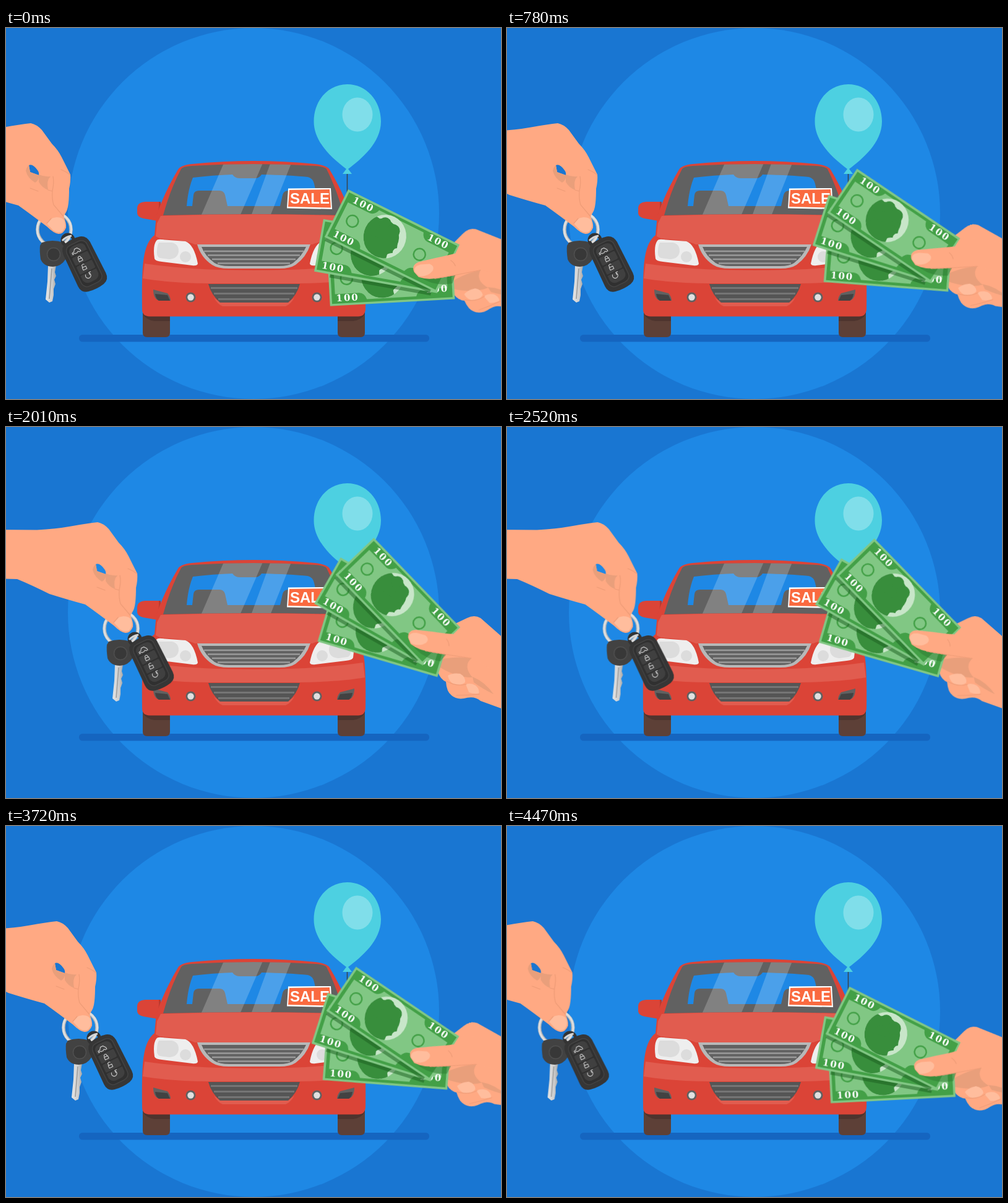
An HTML page that plays this animation: 800 px wide and 600 px high, repeating every 4500 ms.

```html
<!DOCTYPE html>
<html lang="en">
<head>
<meta charset="utf-8">
<title>Car sale</title>
<style>
  html, body { margin: 0; width: 100%; height: 100%; overflow: hidden; background: #1976d2; }
  svg { display: block; width: 100vw; height: 100vh; }
  .sale { font: bold 24px "Liberation Sans", Arial, sans-serif; fill: #fff; text-anchor: middle; }
  .value { font: bold 15px "DejaVu Serif", serif; letter-spacing: 2px; fill: #fff; text-anchor: middle; }
  .skin { fill: #ffa983; }
  .shade { fill: #e99f7b; }
  .nail { fill: #ffbd9d; }
  .crease { fill: none; stroke: #ee9c77; stroke-width: 1.2; stroke-linecap: round; }
  .red { fill: #db4437; }
  .light { fill: #e15c4f; }
  .icon { fill: none; stroke: #c8c8c8; stroke-width: 1.3; }
  .drop { stroke: #1b5e20; stroke-width: 7; opacity: .5; }
  #money { transform-origin: 810px 340px; }
</style>
</head>
<body>
<svg viewBox="0 0 800 600">
  <defs>
    <linearGradient id="steel" x2="1">
      <stop offset="0" stop-color="#e6e6e6"/>
      <stop offset=".6" stop-color="#cfcfcf"/>
      <stop offset="1" stop-color="#a8a8a8"/>
    </linearGradient>
    <clipPath id="oval"><ellipse cx="87" cy="42" rx="34.500" ry="35.500"/></clipPath>
    <clipPath id="glass"><path d="M283 228Q285 224 300 223Q400 217 500 223Q515 224 518 228Q535 262 546 303Q400 299 254 303Q265 262 283 228Z"/></clipPath>

    <g id="bill">
      <rect width="202" height="86" fill="#81c784"/>
      <rect x="3.500" y="3.500" width="195" height="79" fill="#43a047"/>
      <path fill="#81c784" d="M60 8H140Q143 18 152 19H191V67H152Q143 68 140 78H60Q57 68 48 67H9V19H48Q57 18 60 8Z"/>
      <ellipse cx="87" cy="42" rx="34.500" ry="35.500" fill="#c8e6c9"/>
      <g fill="#388e3c" clip-path="url(#oval)">
        <ellipse cx="81" cy="46" rx="30" ry="30"/>
        <circle cx="62" cy="30" r="11"/>
        <circle cx="78" cy="23" r="10"/>
        <circle cx="95" cy="28" r="11"/>
        <path d="M66 50L110 42 113 50 108 54 110 60 103 65 106 82H60Z"/>
      </g>
      <g fill="none" stroke="#43a047" stroke-width="2.500">
        <circle cx="29" cy="43" r="9.500"/>
        <circle cx="150" cy="43" r="9.500"/>
      </g>
      <g class="value">
        <text x="33" y="16">100</text><text x="168" y="16">100</text><text x="29" y="79">100</text>
      </g>
    </g>

    <g id="side">
      <path fill="#5d4037" d="M221 450H265V493Q265 500 258 500H228Q221 500 221 493Z"/>
      <path fill="#4e342e" d="M221 450H265V474H240Q226 472 221 462Z"/>
      <path class="red" d="M249 281H225Q212 282 212 292V300Q213 306 222 308L245 312 250 303Z"/>
      <path fill="#b93a30" d="M247 281H250L250 303 245 312 243 306Q248 295 247 281Z"/>
    </g>
    <g id="lamps">
      <path fill="#eee" d="M240 373Q237 352 243 344Q245 341 252 342L290 345Q304 350 310 381Q309 385 301 384L252 378Q241 377 240 373Z"/>
      <path fill="#dcdcdc" d="M247 347H268Q279 349 279 361 278 373 264 374L249 372Q243 370 244 361 244 352 247 347Z"/>
      <circle cx="290" cy="370" r="9" fill="#dcdcdc"/>
      <path fill="#616161" d="M238 423L261 429Q266 435 266 441H247Q238 438 238 423Z"/>
      <path fill="#424242" d="M241 430L261 432 265 441H247Q242 438 241 430Z"/>
      <circle cx="298.500" cy="435.500" r="8" fill="#616161"/>
      <circle cx="298.500" cy="435.500" r="5.200" fill="#e0e0e0"/>
    </g>
  </defs>

  <rect width="800" height="600" fill="#1976d2"/>
  <circle cx="400" cy="300" r="300" fill="#1e88e5"/>
  <rect x="118" y="496" width="566" height="11.500" rx="5.500" fill="#1565c0"/>

  <g id="balloon">
    <path d="M551.500 234V300" stroke="#37474f" stroke-width="1.600"/>
    <path fill="#4dd0e1" d="M551.500 91C582 91 606 117 606 151C606 186 574 212 553 228L559 236H544L550 228C529 212 497.500 186 497.500 151C497.500 117 521 91 551.500 91Z"/>
    <ellipse cx="568" cy="140" rx="24.500" ry="27.500" fill="#80deea"/>
  </g>

  <g id="car">
    <use href="#side"/>
    <use href="#side" transform="matrix(-1 0 0 1 801 0)"/>
    <path class="red" d="M278 229Q282 222 300 220Q400 210 500 220Q519 222 523 229Q544 264 558 303L561 335Q574 345 578 370Q582 390 581 455Q580 466.500 569 466.500H232Q220 466 220 455Q219 390 223 370Q227 345 240 335L243 303Q257 264 278 229Z"/>
    <path class="light" d="M250 304Q400 299 551 304L557 316 559 337Q554 340 547 341Q511 343 495 350H305Q290 343 254 341Q247 340 242 337L244 316Z"/>
    <path class="light" d="M224 381Q300 392 400 392T577 381L580 405Q541 412 474 413H326Q260 412 221 405Z"/>
    <path class="light" d="M336 436L346 444H456L466 436Q460 447 452 450H350Q342 447 336 436Z"/>
    <g clip-path="url(#glass)">
      <rect x="250" y="210" width="300" height="100" fill="#616161"/>
      <path fill="#1e88e5" d="M302 242Q335 238 366 237Q370 243 378 243H404Q410 242 413 237Q460 238 488 241Q496 243 498 252L506 288H292Q294 262 302 242Z"/>
      <path fill="#616161" d="M301 288L303 270Q304 263 312 263H345Q352 263 354 270L358 288ZM443 288L447 270Q449 263 456 263H489Q496 263 497 270L500 288Z"/>
      <path fill="#fff" opacity=".2" d="M354 214H417L378 304H315ZM429 214H463L427 304H396Z"/>
    </g>
    <path fill="#fff" d="M456 259.500L525 259 527 293 454 291.500Z"/>
    <path fill="#fa6a3f" d="M458 262L523 261 525 290.500 456 289Z"/>
    <text class="sale" x="491" y="284">SALE</text>
    <path fill="#b8b8b8" d="M309 350H492Q485 371 468 383Q459 389 442 389H360Q342 389 333 383Q315 371 309 350Z"/>
    <path fill="#616161" d="M316 354H485Q478 369 464 380Q457 385 441 385H361Q345 385 337 380Q322 369 316 354Z"/>
    <path stroke="#9a9a9a" stroke-width="2.600" d="M320 361H481M326 367.500H475M333 374H468M342 380.500H459"/>
    <path fill="#555" d="M327 414H475Q470 432 456 444H346Q332 432 327 414Z"/>
    <path stroke="#757575" stroke-width="3" d="M331 420.500H471M336 429.500H466M343 438.500H458"/>
    <use href="#lamps"/>
    <use href="#lamps" transform="matrix(-1 0 0 1 801 0)"/>
  </g>

  <g id="money">
    <g transform="rotate(-19.650 810 340)">
      <path class="skin" d="M698 396Q702 408 711 412Q712 428 720 434Q728 441 740 439Q757 434 767 443L800 455 900 492V425L800 338 767 309Q757 303 745 309L722 320 680 360Z"/>
      <path class="shade" d="M700 376Q730 370 752 374Q738 387 754 405Q730 406 700 388ZM754 404Q774 412 788 432Q771 424 756 413Z"/>
      <path class="nail" d="M714 402Q722 397 734 399Q743 404 742 413Q735 419 724 416 716 412 714 402ZM743 416Q751 413 759 418 766 424 764 431 755 432 748 429Z"/>
      <path class="crease" d="M712 411Q727 420 744 416M728 434Q747 434 765 432"/>
    </g>
    <g transform="translate(519 364) rotate(-3.200)">
      <use href="#bill"/>
      <text class="value" x="174" y="73">100</text>
    </g>
    <g transform="translate(513 309) rotate(10)">
      <path class="drop" d="M26 88H192"/>
      <use href="#bill"/>
    </g>
    <g transform="translate(553 261) rotate(26.400)">
      <path class="drop" d="M3 88H192"/>
      <use href="#bill"/>
    </g>
    <g transform="rotate(-19.650 810 340)">
      <path fill="#2e7d32" opacity=".5" d="M656 352Q680 362 712 367L702 379Q672 374 656 352Z"/>
      <path class="skin" d="M650 341Q649 329 662 328L690 331Q710 334 723 335L736 322 800 345V400L752 374Q735 370 712 368Q692 366 678 362Q664 359 654 351Z"/>
      <path class="nail" d="M651 341Q651 332 664 333L678 337Q685 343 679 349 668 356 655 350Z"/>
      <path class="crease" d="M678 362Q715 369 752 374M712 343Q716 348 716 354"/>
    </g>
  </g>

  <g id="keys">
    <circle cx="186" cy="326" r="27" fill="none" stroke="#b0b0b0" stroke-width="5.500"/>
    <circle cx="186" cy="326" r="27.500" fill="none" stroke="#dedede" stroke-width="3.600"/>
    <path fill="url(#steel)" d="M176 384H189L187 395 189 401 186 407 188 414 185 422 185 432 183 442 178 444 172 439 175 410Z"/>
    <path stroke="#999" stroke-width="1.500" d="M182 389L178 438"/>
    <path fill="#424242" d="M166 347Q183 341 201 347L205 353V373Q197 386 184 386Q169 386 164 374Q162 360 163 352Z"/>
    <circle cx="185" cy="366" r="10.500" fill="#383838" stroke="#505050" stroke-width="1.500"/>
    <circle cx="208" cy="343" r="9" fill="none" stroke="#333" stroke-width="5"/>
    <path d="M199 344Q205 337 214 336" fill="none" stroke="#d6d6d6" stroke-width="3"/>
    <g transform="translate(234.500 381.500) rotate(-26)">
      <path fill="#363636" d="M-13 -43Q0 -46 13 -43Q23 -40 24 -28L25 28Q25 40 14 43Q0 46 -14 43Q-25 40 -25 28L-24 -28Q-23 -40 -13 -43Z"/>
      <rect x="-18" y="-37" width="36" height="73" rx="10" fill="#303030" stroke="#444" stroke-width="1.500"/>
      <g fill="#404040">
        <path d="M-14 -19V-27Q-12 -34 -3 -34H3Q12 -34 14 -27V-19Z"/>
        <rect x="-14" y="-17" width="28" height="14" rx="2"/>
        <rect x="-14" y="-1" width="28" height="14" rx="2"/>
        <path d="M-14 15H14V23Q12 31 3 31H-3Q-12 31 -14 23Z"/>
      </g>
      <g class="icon" transform="translate(-3 -2) scale(.88)">
        <path d="M-8 -22V-25L-4 -26 -1 -30H4L8 -25V-22H5Q3 -25 1 -22H-3Q-5 -25 -7 -22Z"/>
        <path d="M-3 -10H4V-5H-3ZM-2 -10V-13Q1 -16 3 -13V-10M-3 7H4V12H-3ZM-2 7V3Q1 0 3 3"/>
        <path d="M-3 21A5 5 0 1 0 4 21M4 25V20H8"/>
      </g>
    </g>
    <path class="skin" fill-rule="evenodd" d="M-20 166L50 166.500Q80 165 105 160.500Q132 155.500 148 154Q158 156 166 165L182 187Q192 197 198 209L212 237Q213 247 210 260Q210 287 206 296L201 305Q206 316 205 323Q201 333 193 333Q185 332 174 321Q149 302 128 287Q102 280 70 270Q40 255 18 246L-20 245ZM145 222Q151 219 159 230Q162 234 161 238L147 233Z"/>
    <path class="shade" d="M140 231Q141 225 145 222L147 233 161 238Q162 246 155 250Q143 243 140 231ZM161 237Q170 241 180 240Q173 246 176 262Q166 258 161 249Z"/>
    <path class="nail" d="M174 316Q178 307 190 306 200 306 203 313 205 322 199 329 192 333 184 327Z"/>
    <path class="crease" d="M176 262L183 264Q182 276 185 286L201 305M184 240Q186 250 183 263M197 229Q205 232 211 237M147 259L160 264M174 316L181 308"/>
  </g>
</svg>
<script>
  // Swing from one pose to the other and back at a steady pace, in 30 ms ticks.
  const swing = (id, from, to) =>
    document.getElementById(id).animate([
      { transform: from, easing: 'steps(75)' },
      { transform: to, easing: 'steps(75)' },
      { transform: from }
    ], { duration: 4500, iterations: Infinity });

  swing('keys', 'translateX(-108px)', 'translateX(13px)');
  swing('money', 'rotate(0deg)', 'rotate(22deg)');
</script>
</body>
</html>
```
